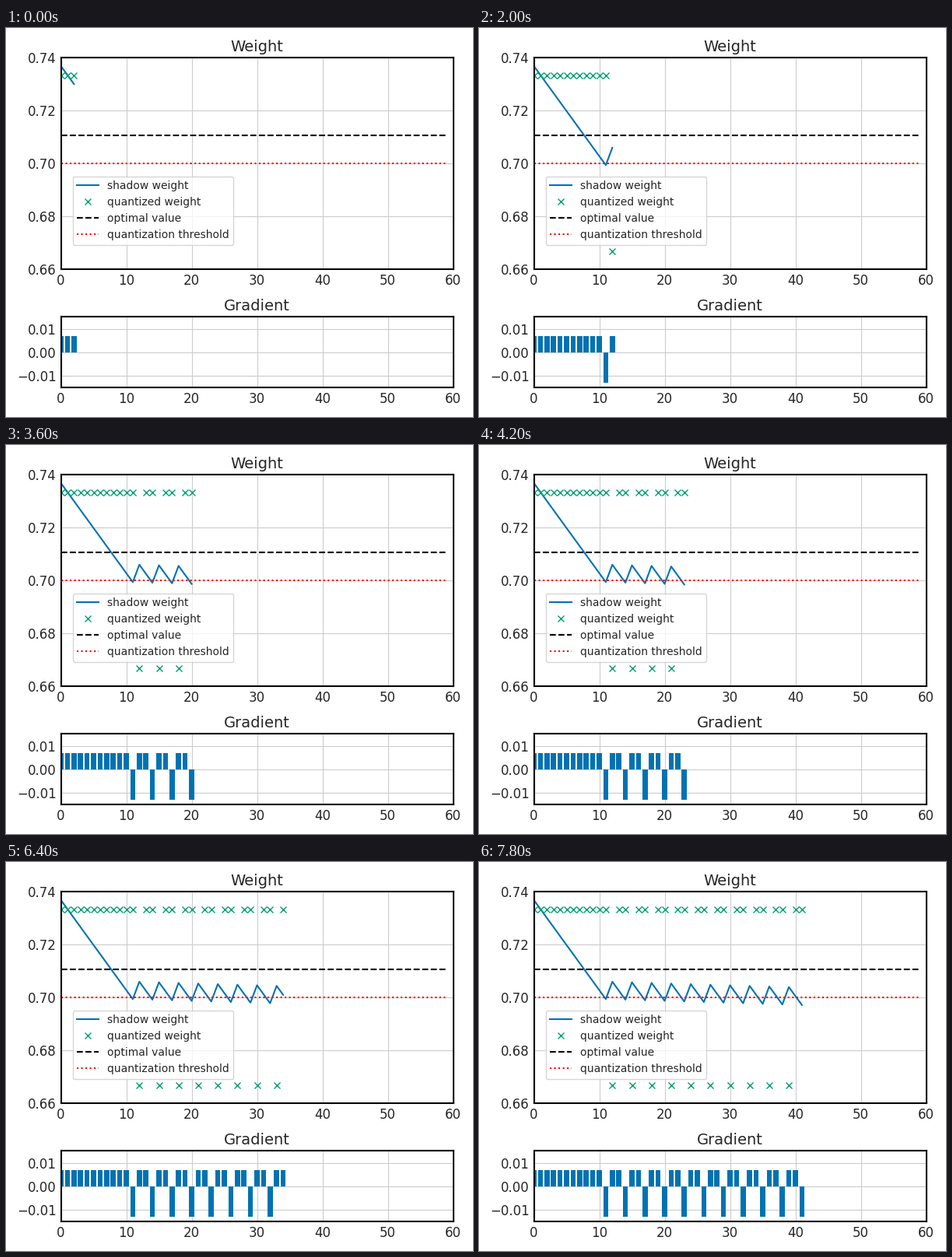
Recreate the animation shown at these times as a matplotlib script. Size 600x500 px, loop 8 s.

```python
import numpy as np
import matplotlib.pyplot as plt
from matplotlib.animation import FuncAnimation

W, H, DPI = 600, 500, 100
STEPS, FRAMES, INTERVAL = 60, 40, 200
BLUE, GREEN, DARK = "#0072B2", "#009E73", "0.15"

HIGH, LOW = 0.7333, 0.6667
THRESHOLD, OPTIMUM = 0.70, 0.7106
START, RATE, SLOPE = 0.7368, 0.5, 0.3

plt.rcParams.update({
    "font.family": "DejaVu Sans",
    "text.color": DARK,
    "axes.axisbelow": True,
})


def simulate():
    """Gradient descent on a shadow weight that is rounded to two levels."""
    weight, quant, grad = np.empty((3, STEPS))
    w, shown = START, HIGH
    for i in range(STEPS):
        weight[i], quant[i] = w, shown
        shown = HIGH if w >= THRESHOLD else LOW
        grad[i] = SLOPE * (shown - OPTIMUM)
        w -= RATE * grad[i]
    return weight, quant, grad


def add_panel(top, bottom, title, ylim, yticks):
    left, right = 70.5, 574.5
    ax = fig.add_axes([left / W, 1 - bottom / H,
                       (right - left) / W, (bottom - top) / H])
    ax.set(xlim=(0, STEPS), ylim=ylim, yticks=yticks)
    ax.set_title(title, fontsize=14)
    ax.grid(color="0.8", lw=0.8)
    ax.tick_params(length=0, labelsize=12, labelcolor=DARK)
    ax.tick_params(axis="x", pad=4.5)
    ax.tick_params(axis="y", pad=4)
    for spine in ax.spines.values():
        spine.set(linewidth=1.5, color="black")
    return ax


weight, quant, grad = simulate()
steps = np.arange(STEPS)

fig = plt.figure(figsize=(W / DPI, H / DPI), dpi=DPI, facecolor="white")
top_ax = add_panel(38, 310, "Weight", (0.66, 0.74),
                   [0.66, 0.68, 0.70, 0.72, 0.74])
low_ax = add_panel(371.4, 462, "Gradient", (-0.015, 0.015),
                   [-0.01, 0, 0.01])

shadow, = top_ax.plot([], [], color=BLUE, lw=1.5, label="shadow weight")
crosses, = top_ax.plot([], [], "x", color=GREEN, ms=6, mew=1,
                       label="quantized weight")
top_ax.plot(steps, np.full(STEPS, OPTIMUM), "--", color="black", lw=1.5,
            label="optimal value")
top_ax.plot(steps, np.full(STEPS, THRESHOLD), ":", color="red", lw=1.5,
            label="quantization threshold")
top_ax.legend(loc=(0.03, 0.115), fontsize=10)

bars = low_ax.bar(steps, np.zeros(STEPS), width=0.8, color=BLUE, lw=0)
low_ax.set(xlim=(0, STEPS), ylim=(-0.015, 0.015))


def draw(frame):
    n = frame + 3
    shadow.set_data(steps[:n], weight[:n])
    crosses.set_data(steps[:n], quant[:n])
    for i, bar in enumerate(bars):
        bar.set_height(grad[i] if i < n else 0)
        bar.set_visible(i < n)
    return [shadow, crosses, *bars]


anim = FuncAnimation(fig, draw, frames=FRAMES, interval=INTERVAL,
                     repeat=True, repeat_delay=0)
plt.show()
```
